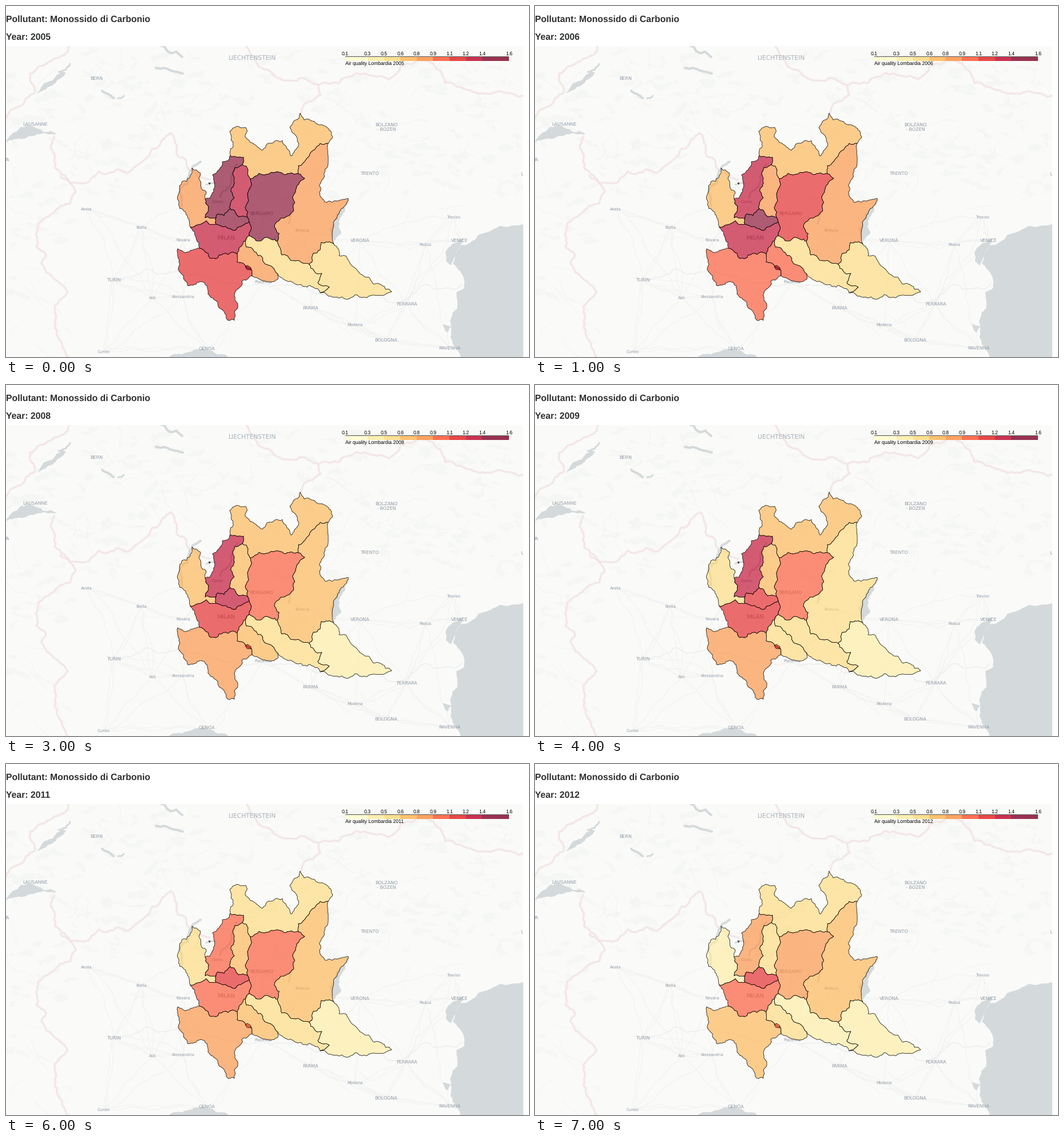
Recreate the animation shown at these times as a matplotlib script. Size 914x613 px, loop 8000 ms.

```python
import math
import random

import matplotlib.pyplot as plt
from matplotlib.animation import FuncAnimation
from matplotlib.patches import Polygon, Rectangle

plt.rcParams["text.hinting"] = "none"

W, H, DPI = 914, 613, 72
MAP_TOP, MAP_RIGHT = 70, 904
ZOOM = 0.715  # page zoom, applied to line widths, legend and headings
WATER = "#d4dadc"
RAMP = ["#ffffcc", "#ffeda0", "#fed976", "#feb24c", "#fd8d3c",
        "#fc4e2a", "#e31a1c", "#bd0026", "#800026"]
YEARS = range(2005, 2013)

fig = plt.figure(figsize=(W / DPI, H / DPI), dpi=DPI, facecolor="white")
ax = fig.add_axes([0, 0, 1, 1])
ax.set_xlim(0, W)
ax.set_ylim(H, 0)
ax.axis("off")


def rough(pts, amp=0.1, step=5):
    """Join key points by a fractal line: split each leg and shift its middle."""
    rng = random.Random(str(pts))

    def split(a, b):
        (x0, y0), (x1, y1) = a, b
        if math.dist(a, b) < step:
            return [b]
        k = max(-2 * amp, min(2 * amp, rng.gauss(0, amp)))
        mid = ((x0 + x1) / 2 - k * (y1 - y0), (y0 + y1) / 2 + k * (x1 - x0))
        return split(a, mid) + split(mid, b)

    out = [pts[0]]
    for a, b in zip(pts, pts[1:]):
        out += split(a, b)
    return out


def line(color, width, *pts, z=1.0, amp=0.1, style="-"):
    ax.plot(*zip(*rough(pts, amp)), color=color, lw=width, ls=style, zorder=z,
            solid_capstyle="round", solid_joinstyle="round")


def area(color, *pts, z=1.0, amp=0.08):
    ax.add_patch(Polygon(rough(pts + pts[:1], amp), fc=color, lw=0, zorder=z))


def box(x, y, w, h, color, z, **kw):
    ax.add_patch(Rectangle((x, y), w, h, fc=color, lw=0, zorder=z, **kw))


def border(*pts):
    line("#f6eeee", 4, *pts, z=0.6)
    line("#f0dee0", 1, *pts, z=0.7)


PLACES = {
    "BERN": (158, 126), "LAUSANNE": (51.5, 207.5), "BOLZANO": (665, 208),
    "- BOZEN": (665, 216), "TRENTO": (635.5, 293), "VERONA": (618.5, 410),
    "VENICE": (792.5, 410.5), "TURIN": (188, 478.5), "GENOA": (351, 599.5),
    "PARMA": (532, 527), "BOLOGNA": (664, 584), "FERRARA": (700, 520.5),
    "RAVENNA": (775.5, 597.5), "BERGAMO": (447, 363), "MILAN": (384.5, 405),
    "VA": (1.5, 268), "U": (902.5, 293.5), "Treviso": (781.5, 368),
    "Padua": (733, 416), "Aosta": (141, 354.5), "Biella": (236.5, 386),
    "Novara": (310, 408.5), "Asti": (256.5, 509.5), "Alessandria": (309.5, 507),
    "Cuneo": (171, 603), "Modena": (609.5, 556), "Piacenza": (449.5, 481.5),
    "Como": (370, 341), "Brescia": (518, 391), "LIECHTENSTEIN": (431, 90),
}
SIZES = {"MILAN": 9.7, "LIECHTENSTEIN": 10.6}

# Land, woods in the mountains, roads
box(0, MAP_TOP, MAP_RIGHT, H - MAP_TOP, "#fafaf8", 0)
rng = random.Random(7)
for _ in range(260):
    x, y = rng.uniform(0, 900), rng.uniform(75, 340)
    if x < 130:
        y += rng.uniform(0, 270)
    w, h, tilt = rng.uniform(5, 22), rng.uniform(2, 7), rng.uniform(-8, 8)
    area("#f5f7f4", (x - w, y + tilt), (x, y - h), (x + w, y - tilt), (x, y + h), z=0.2, amp=0.2)

cities = [p for p in PLACES.values() if 340 < p[1] and p[0] < 800]
for a in cities:
    for b in sorted(cities, key=lambda c: math.dist(a, c))[1:5]:
        line("#f1f2f1", 1, a, b, z=0.4, amp=0.05)
for i in range(80):
    x, y = rng.uniform(0, 850), rng.uniform(80, 600 if i % 2 else 300)
    end = x + rng.uniform(-60, 60), y + rng.uniform(-45, 45)
    if i % 2:
        line("#f2f3f2", 0.8, (x, y), end, z=0.3)
    else:
        line("#efe6e6", 0.7, (x, y), end, z=0.3, style=(0, (2, 2)))

# National borders
border((0, 196), (50, 152), (42, 118), (100, 86), (110, 70))
border((84, 228), (78, 248), (95, 290), (122, 325), (112, 345), (56, 380), (53, 420),
       (70, 435), (62, 450), (108, 500), (85, 560), (108, 613))
border((95, 297), (135, 310), (196, 285), (215, 290), (250, 262), (288, 222),
       (300, 262), (322, 287), (356, 303))
border((515, 188), (550, 155), (546, 138), (610, 118), (670, 128), (690, 105),
       (740, 98), (768, 135), (850, 152), (904, 157))
border((420, 70), (440, 103), (490, 130), (546, 138))

# Sea, lagoons, lakes, river
area(WATER, (940, 366), (866, 384), (825, 400), (794, 418), (781, 450), (799, 472),
     (801, 492), (787, 500), (789, 528), (780, 536), (778, 566), (782, 592), (794, 613),
     (800, 700), (1100, 700), (1100, 360), amp=0.06)
area(WATER, (800, 406), (776, 420), (768, 432), (769, 446), (778, 453), (790, 425))
area(WATER, (763, 556), (778, 560), (772, 570))
area(WATER, (0, 237), (8, 226), (25, 212), (45, 209), (89, 224), (60, 224), (25, 232))
area(WATER, (270, 613), (325, 603), (365, 606), (388, 613), (330, 660))
area(WATER, (600, 338), (582, 375), (586, 395), (573, 411), (565, 390), (584, 356))
area(WATER, (55, 153), (62, 141), (97, 113), (105, 117), (84, 136))
for width, *shore in [
        (3, (92, 115), (112, 101)), (4, (168, 148), (188, 161)), (3, (196, 161), (206, 157)),
        (4, (262, 108), (286, 112), (309, 118)), (4, (272, 70), (284, 80), (308, 89)),
        (4, (340, 272), (321, 290), (303, 325), (307, 350)), (3, (350, 312), (366, 309)),
        (3, (404, 276), (393, 308), (374, 334)), (3, (497, 362), (494, 380))]:
    line(WATER, width, *shore)
line("#e6eaea", 1, (188, 474), (300, 462), (350, 472), (500, 488), (552, 503), (796, 486), z=0.5)

for name, (x, y) in PLACES.items():
    size = SIZES.get(name, 8 if name.isupper() else 6.9)
    ax.text(x, y + 0.36 * size, name, fontsize=size, ha="center", zorder=3,
            color="#a9b3bc" if size > 10 else "#909ca7", family="DejaVu Sans")

# Junctions of the province borders, and the bends of each border between two of them
NODES = dict(
    A=(392, 261), B=(563, 240), C=(511, 293), D=(427, 302), E=(413, 277), F=(392, 354),
    G=(348, 337), J=(367, 370), K=(367, 381), L=(322, 386), M=(422, 369), N=(425, 377),
    O=(425, 401), P=(474, 411), Q=(573, 416), R=(530, 451), S=(549, 501), T=(475, 468),
    U=(421, 404), V=(404, 433), W=(338, 423), X=(430, 471))
borders = {}


def link(ends, *bends):
    path = rough((NODES[ends[0]], *bends, NODES[ends[1]]), amp=0.12)
    borders[ends], borders[ends[::-1]] = path, path[::-1]


link("AB", (397, 238), (391, 219), (403, 210), (419, 212), (425, 235), (448, 252), (456, 241),
     (483, 235), (498, 262), (511, 245), (507, 227), (496, 212), (514, 187), (535, 201),
     (562, 213), (570, 231))
link("BC", (549, 240), (530, 262), (511, 279))
link("CD", (490, 294), (460, 293))
link("DE", (423, 286))
link("EA", (415, 264))
link("EF", (400, 282), (394, 318), (399, 335))
link("AG", (378, 272), (361, 295), (363, 324), (356, 336))
link("GJ", (354, 350), (348, 370))
link("JF", (370, 363), (381, 366))
link("JK")
link("KL", (355, 381), (350, 375), (336, 382))
link("LG", (314, 360), (302, 341), (304, 322), (321, 300), (325, 283), (340, 292),
     (337, 301), (350, 325))
link("FM", (406, 368))
link("MD", (418, 352), (425, 320))
link("MN")
link("NK", (402, 391), (383, 385))
link("NO", (428, 390))
link("OP", (446, 410), (454, 404))
link("PC", (469, 386), (480, 371), (498, 363), (506, 325), (522, 301))
link("BQ", (563, 275), (552, 304), (560, 343), (598, 336), (572, 378))
link("QR", (551, 413), (549, 426), (537, 432))
link("RP", (515, 447), (482, 435))
link("RS", (552, 467), (545, 483), (565, 491))
link("ST", (510, 487), (492, 481))
link("TU", (452, 450), (437, 430), (420, 421))
link("OU")
link("UV", (414, 415), (407, 427))
link("VW", (372, 435), (358, 441), (353, 432))
link("WL", (332, 404))
link("WX", (314, 431), (300, 424), (302, 455), (317, 488), (340, 481), (353, 503), (370, 518),
     (388, 549), (399, 549), (405, 520), (399, 505), (412, 481))
link("VX", (404, 447), (428, 459))
link("XT", (452, 480), (474, 478))
link("QS", (582, 436), (605, 454), (636, 476), (674, 499), (610, 504), (564, 507))


class Province:
    """A shape whose colour class holds from each given year until the next change."""

    def __init__(self, ring, classes, pts=None):
        if ring:
            pts = [p for a, b in zip(ring, ring[1:] + ring[0]) for p in borders[a + b]]
        self.classes = classes
        self.patch = ax.add_patch(Polygon(pts, ec="black", lw=ZOOM, joinstyle="round", zorder=4))

    def paint(self, year):
        last = max(y for y in self.classes if y <= year)
        self.patch.set_facecolor((RAMP[self.classes[last]], 0.63))


como = {2005: 8, 2006: 7, 2010: 5, 2012: 4}
milano = {2005: 7, 2007: 6, 2010: 5}
provinces = [
    Province("LGJK", {2005: 4, 2006: 3, 2009: 2, 2012: 1}),
    Province("AGJFE", como),
    Province("EFMD", {2005: 7, 2006: 4, 2007: 2, 2008: 3, 2012: 2}),
    Province("ABCDE", {2005: 3, 2011: 2}),
    Province("DMNOPC", {2005: 8, 2006: 6, 2007: 5, 2012: 4}),
    Province("BQRPC", {2005: 4, 2007: 3, 2009: 2, 2010: 3}),
    Province("FMNKJ", {2005: 8, 2007: 7, 2009: 6, 2010: 5, 2011: 6}),
    Province("NOUVWLK", milano),
    Province("WXV", {2005: 6, 2006: 5, 2007: 4, 2012: 3}),
    Province("UVXT", {2005: 4, 2006: 5, 2007: 4, 2008: 3, 2009: 2, 2010: 3, 2012: 2}),
    Province("OPRSTU", {2005: 2, 2012: 1}),
    Province("QSR", {2005: 2, 2007: 1}),
    Province("", como, [(354, 309), (357, 309), (356, 311.5)]),
    Province("", milano, [(418, 455), (422, 453), (428, 457), (428, 461), (421, 460)]),
]

# Page around the map
box(0, 0, W, MAP_TOP, "white", 5)
box(MAP_RIGHT, 0, W - MAP_RIGHT, H, "white", 5)
head = dict(family="Liberation Sans", weight="bold", fontsize=22 * ZOOM, color="#2e2f30", zorder=6)
ax.text(0, 27.4, "Pollutant: Monossido di Carbonio", **head)
year_text = ax.text(0, 58.7, "", **head)

# Legend: values and classes rise in equal steps, the outer ones are wider
small = dict(family="Liberation Sans", fontsize=12 * ZOOM, color="black", zorder=6)
LEFT, RIGHT, BAR = 593, 879, 88.6
stops = [LEFT] + [632 + 40 * ZOOM * i for i in range(8)] + [RIGHT]
ticks = [0.1] + [0.304 + 0.1499 * i for i in range(8)] + [1.6]
for x0, x1, color in zip(stops, stops[1:], RAMP):
    box(x0, BAR, x1 - x0, 10 * ZOOM, color, 5.5, alpha=0.8)
for x, tick in zip(stops, ticks):
    ax.text(x, BAR - 4 * ZOOM, f"{tick:.1f}", ha="center", **small)
box(LEFT, BAR - ZOOM, RIGHT - LEFT, ZOOM, "black", 6, snap=False)
caption = ax.text(LEFT, BAR + 21 * ZOOM, "", **small)


def update(i):
    year = YEARS[i]
    for province in provinces:
        province.paint(year)
    year_text.set_text(f"Year: {year}")
    caption.set_text(f"Air quality Lombardia {year}")
    return [p.patch for p in provinces] + [year_text, caption]


anim = FuncAnimation(fig, update, frames=len(YEARS), interval=1000, repeat=True, repeat_delay=0)
plt.show()
```
